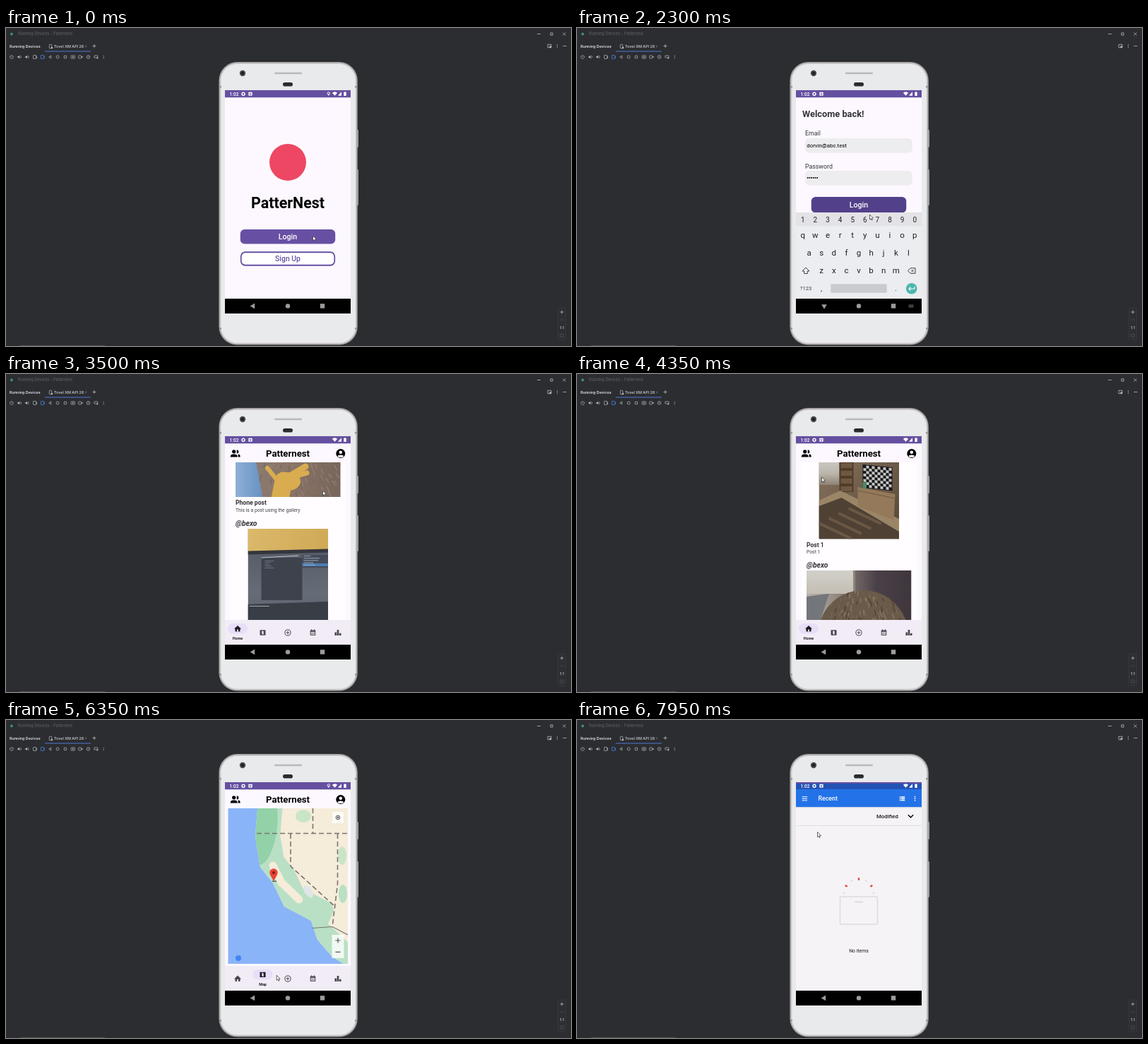
Write an HTML page with a canvas that moves like this. It is 800x450 px and loops after 8 s.

```html
<!DOCTYPE html>
<html lang="en">
<head>
<meta charset="utf-8">
<title>App walkthrough</title>
<style>
html, body { margin: 0; width: 100%; height: 100%; overflow: hidden; background: #2b2d30; }
canvas { display: block; width: 800px; height: 450px; }
</style>
</head>
<body>
<canvas id="stage" width="800" height="450"></canvas>
<script>
const ctx = document.getElementById('stage').getContext('2d');
const LOOP = 8000, STEP = 50, TAU = Math.PI * 2;
const PURPLE = '#6750a4', PRESSED = '#53408a', INK = '#1d1b20', SOFT = '#35333a', PAGE = '#fdf8ff';
const APP = 'Patternest', MAIL = 'dorvin@abc.test';
const CX = 399; // centre of the phone

// ---- drawing helpers ----
function paint(fill, stroke, lw = 1) {
  if (fill) { ctx.fillStyle = fill; ctx.fill(); }
  if (stroke) { ctx.strokeStyle = stroke; ctx.lineWidth = lw; ctx.stroke(); }
}
function rect(x, y, w, h, fill) {
  ctx.fillStyle = fill;
  ctx.fillRect(x, y, w, h);
}
function box(x, y, w, h, r, fill, stroke, lw) {
  ctx.beginPath();
  ctx.roundRect(x, y, w, h, r);
  paint(fill, stroke, lw);
}
// box given by its centre
function mid(x, y, w, h, r, fill, stroke, lw) {
  box(x - w / 2, y - h / 2, w, h, r, fill, stroke, lw);
}
function oval(x, y, rx, ry, fill, turn = 0) {
  ctx.beginPath();
  ctx.ellipse(x, y, rx, ry, turn, 0, TAU);
  paint(fill);
}
function circle(x, y, r, fill, stroke, lw) {
  arc(x, y, r, 0, TAU, fill, stroke, lw);
}
function arc(x, y, r, from, to, fill, stroke, lw) {
  ctx.beginPath();
  ctx.arc(x, y, r, from, to);
  paint(fill, stroke, lw);
}
function trace(pts) {
  ctx.beginPath();
  for (let i = 0; i < pts.length; i += 2) ctx.lineTo(pts[i], pts[i + 1]);
}
function poly(fill, ...pts) {
  trace(pts);
  ctx.closePath();
  paint(fill);
}
function line(stroke, lw, ...pts) {
  trace(pts);
  paint(null, stroke, lw);
}
// triangle around a centre, pointing along the angle
function tri(x, y, r, angle, fill) {
  ctx.beginPath();
  for (let i = 0; i < 3; i++) {
    const a = angle + i * TAU / 3;
    ctx.lineTo(x + r * Math.cos(a), y + r * Math.sin(a));
  }
  ctx.closePath();
  paint(fill);
}
function plus(x, y, r, color, lw = 1) {
  line(color, lw, x - r, y, x + r, y);
  line(color, lw, x, y - r, x, y + r);
}
function cross(x, y, r, color, lw = .8) {
  line(color, lw, x - r, y - r, x + r, y + r);
  line(color, lw, x - r, y + r, x + r, y - r);
}
function kebab(x, y, gap, r, color) {
  for (let i = -1; i < 2; i++) circle(x, y + i * gap, r, color);
}
function text(s, x, y, size, color, style = '', align = 'left', family = 'Roboto') {
  ctx.font = `${style} ${size}px ${family}, sans-serif`;
  ctx.textAlign = align;
  ctx.fillStyle = color;
  ctx.fillText(s, x, y);
}
function clipped(x, y, w, h, draw) {
  ctx.save();
  ctx.beginPath();
  ctx.rect(x, y, w, h);
  ctx.clip();
  draw();
  ctx.restore();
}
function fade(x0, y0, x1, y1, ...colors) {
  const g = ctx.createLinearGradient(x0, y0, x1, y1);
  colors.forEach((c, i) => g.addColorStop(i / (colors.length - 1), c));
  return g;
}
function seeded(n) {
  return () => (n = n * 16807 % 2147483647) / 2147483647;
}

// ---- timing helpers ----
const clamp = v => Math.max(0, Math.min(1, v));
const ease = v => v * v * (3 - 2 * v);
const span = (t, from, to) => clamp((t - from) / (to - from));
function track(keys, t) {
  let i = 0;
  while (i < keys.length - 2 && t >= keys[i + 1][0]) i++;
  const [a, b] = [keys[i], keys[i + 1]];
  const p = ease(span(t, a[0], b[0]));
  return a.slice(1).map((v, k) => v + (b[k + 1] - v) * p);
}
// time, x, y of each place the pointer heads for
const POINTER = [
  [350, 434.5, 294], [800, 372, 164], [1650, 372, 210], [2250, 414.5, 264], [2450, 414.5, 264],
  [2800, 448.5, 165], [3600, 448.5, 165], [4350, 346.5, 146], [4850, 473, 110],
  [5400, 368.5, 329.5], [5900, 363, 363], [6800, 403.5, 359.5], [7400, 400, 240], [7950, 340.5, 158.5]
];
const SCROLL = [[2750, 57], [3400, -301], [3650, -301], [4250, 0]];

// ---- desktop window ----
const TOOL = {
  power(x, y, c) { arc(x, y, 2.4, -1, 4.14, null, c, .7); line(c, .7, x, y - 3, x, y); },
  sound(x, y, c) { tri(x - .8, y, 2.4, Math.PI, c); arc(x, y, 2.4, -1, 1, null, c, .7); },
  turn(x, y, c) { mid(x, y, 4, 5, .5, null, c, .7); line(c, .7, x + 3, y - 1.5, x + 3, y + 2); },
  back(x, y, c) { line(c, .7, x + 1.5, y - 2, x - 1.5, y, x + 1.5, y + 2, x + 1.5, y - 2); },
  ring(x, y, c) { circle(x, y, 2, null, c, .7); },
  square(x, y, c) { mid(x, y, 3.4, 3.4, 0, null, c, .7); },
  shot(x, y, c) { mid(x, y, 5.4, 4.2, .6, null, c, .7); circle(x, y, 1, c); },
  clip(x, y, c) { mid(x - 1, y, 4, 3.8, .5, null, c, .7); tri(x + 2.2, y, 1.4, Math.PI, c); },
  clock(x, y, c) { circle(x, y, 2.3, null, c, .7); line(c, .6, x, y - 1.4, x, y, x + 1, y + .6); },
  link(x, y, c) { mid(x, y - .5, 5, 3, .3, null, c, .7); circle(x + 2, y + 1.5, 1.1, c); },
  more(x, y, c) { kebab(x, y, 1.8, .55, c); }
};
const TOOLBAR = 'power sound sound turn turn back ring square shot clip clock link more'.split(' ');

function desktop() {
  rect(0, 0, 800, 450, '#2b2d30');
  const g = '#b9bbc0';
  circle(8, 8.5, 2, '#3f8a86');
  text('Running Devices - ' + APP, 17, 10.4, 5.6, '#62656b', '', 'left', 'Inter');
  text('Running Devices', 5, 27.6, 5.4, '#dfe1e5', '600', 'left', 'Inter');
  text('Tovel XM API 28', 68, 27.6, 5.4, '#d3d5d9', '500', 'left', 'Inter');
  rect(55, 32.4, 65, 1.2, '#4b69b8');
  mid(63, 26, 3.5, 5.5, .8, null, g, .7);
  circle(65, 28, 1.3, g);
  cross(113, 25.8, 1.3, '#7b7e85', .6);
  plus(125, 25.5, 2.6, g, .8);
  TOOLBAR.forEach((name, i) => TOOL[name](8 + i * 10.85, 41, i === 4 ? '#548af7' : g));

  line(g, .8, 752, 8.5, 757, 8.5);
  mid(772.5, 8.5, 3.2, 3.2, 0, null, g, .8);
  cross(790.5, 8.5, 2, g);
  mid(769.5, 25.5, 5, 4.5, 0, null, g, .8);
  rect(769.5, 25.5, 2.5, 2.5, g);
  kebab(780.5, 25.5, 1.8, .6, g);
  line(g, .8, 788.5, 25.5, 793.5, 25.5);

  mid(787, 418.5, 11, 45, 2, '#2d2f33', '#3e4045', .6);
  plus(787, 402, 2.4, g, .8);
  line('#505257', .8, 784.6, 413, 789.4, 413);
  text('1:1', 787, 425.8, 5, g, '600', 'center', 'Inter');
  mid(787, 435, 4.4, 4, 0, null, '#505257', .8);
  rect(20, 449, 120, 1, '#505257');
}

// ---- phone shell and system bars ----
function shell() {
  box(495, 144, 4, 25, 1.2, '#a7a4a6');
  box(495, 200, 4, 51, 1.2, '#a7a4a6');
  ['#a19ea0', '#cfccce', '#e9eaec'].forEach((c, i) =>
    mid(399.6, 248.3, 196.4 - i * 3, 400.4 - i * 3, 26 - i * 1.5, c));
  for (const y of [82, 424]) for (const x of [302, 494]) rect(x, y, 3, 2.5, '#9a9799');
  circle(335, 64, 4.2, '#4a4a4d');
  circle(335, 64, 2.2, '#202024');
  mid(399.5, 64, 39, 2.6, 1.3, '#b9b9bb');
  mid(CX, 79.8, 14, 5.6, 2.8, '#2b2b2e');
}
function statusBar(color, located) {
  const w = '#fff', y = 93.2;
  rect(310, 88, 178, 10.3, color);
  text('1:02', 316.5, 95.6, 6.6, w, '500');
  circle(336, y, 1.9, null, w, 1.3);
  for (let i = 0; i < 8; i++)
    circle(336 + 2.5 * Math.cos(i * TAU / 8), y + 2.5 * Math.sin(i * TAU / 8), .5, w);
  mid(346, y, 5.2, 5, .6, w);
  rect(344.5, y - 1.2, 3, .7, color);
  rect(345, y + .3, 2, 1.2, color);
  if (located) {
    circle(456.8, y - .8, 1.7, null, w, .9);
    tri(456.8, y + 1.2, 1.6, Math.PI / 2, w);
  }
  ctx.beginPath();
  ctx.moveTo(465.5, 95.8);
  ctx.arc(465.5, 95.8, 5.4, -2.3, -.84);
  paint(w);
  poly(w, 470, 95.8, 475, 90.3, 475, 95.8);
  mid(480, y, 3.4, 5.4, .5, w);
}
function systemNav(typing) {
  const g = '#9c9c9c', y = 393.4;
  rect(310, 383, 178, 21, '#000');
  tri(350, y, 4.4, typing ? Math.PI / 2 : Math.PI, g);
  if (typing) mid(473, y, 7, 4.5, .7, '#3e3e3e');
  circle(CX, y, 3.2, g);
  mid(448, y, 6.4, 6.4, 0, g);
}

// ---- shared app parts ----
function button(label, x, y, w, h, size, fill) {
  mid(x, y, w - (fill ? 0 : 2), h - (fill ? 0 : 2), 6, fill || '#fff', fill ? null : PURPLE, 1.8);
  text(label, x, y + size * .36, size, fill ? '#fff' : PURPLE, '500', 'center');
}
function account(x, y, r) {
  circle(x, y, r, '#000');
  circle(x, y - r * .27, r * .35, PAGE);
  oval(x, y + r * .56, r * .62, r * .27, PAGE);
}
function person(x, y) {
  circle(x, y - 2.7, 2.6, '#000');
  box(x - 5, y + 1, 10, 4, [4, 4, 0, 0], '#000');
}
function header() {
  arc(326.8, 109.8, 2.6, -1.6, 1.6, '#000');
  box(328.6, 113.6, 3, 3.9, [0, 3, 0, 0], '#000');
  person(322.7, 112.5);
  text(APP, CX, 117.4, 13.2, '#000', 'bold', 'center');
  account(473.8, 112.5, 6.5);
}
const TABS = [
  (x, y, c, bg) => {
    poly(c, x, y - 4.4, x + 5, y + .4, x - 5, y + .4);
    mid(x, y + 1.6, 7, 4.8, 0, c);
    mid(x, y + 2.6, 2, 3, 0, bg);
  },
  (x, y, c, bg) => {
    mid(x, y, 8, 7.4, .6, c);
    poly(bg, x - 1.2, y - 2.8, x + 1.2, y - 2, x + 1.2, y + 2.8, x - 1.2, y + 2);
  },
  (x, y, c) => { circle(x, y, 4.1, null, c, 1); plus(x, y, 2.2, c, 1); },
  (x, y, c, bg) => {
    mid(x, y + .2, 7.6, 7.6, .8, c);
    for (const d of [-2, 2]) mid(x + d, y - 4, 1, 1.4, 0, c);
    mid(x, y + 1, 5.6, 4.3, 0, bg);
    for (let i = 0; i < 6; i++) mid(x + (i % 3 - 1) * 1.7, y + .2 + (i > 2) * 1.7, 1, 1, 0, c);
  },
  (x, y, c) => [4.5, 8, 3.2].forEach((h, i) => rect(x - 4.5 + i * 3.2, y + 4 - h, 2.6, h, c))
];
function tabs(active, label) {
  const bar = '#f2ecf6', pill = '#e8def8';
  rect(310, 348, 178, 35, bar);
  TABS.forEach((icon, i) => {
    const x = 328 + i * 35.5, on = i === active;
    if (on) mid(x, 360.3, 28, 14.5, 7.2, pill);
    icon(x, on ? 360.4 : 366, on ? INK : '#49454f', on ? pill : bar);
    if (on && label) text(label, x, 376.2, 5.4, INK, 'bold', 'center');
  });
}

// ---- sign-in screens ----
function welcome(t) {
  circle(CX, 190, 26, '#ee4763');
  text('PatterNest', CX, 255.3, 21.4, '#000', 'bold', 'center');
  button('Login', CX, 295.3, 134.5, 20.5, 10.6, t < 300 ? PURPLE : PRESSED);
  button('Sign Up', CX, 326.5, 134.5, 20.5, 10.4);
}
function login(t) {
  text('Welcome back!', 319, 126, 12.8, SOFT, 'bold');
  ['Email', 'Password'].forEach((label, i) => {
    text(label, 323, 152.2 + i * 47, 8.8, SOFT);
    box(323, 156 + i * 46, 152, 20.8, 6, '#ededef');
  });
  text(MAIL.slice(0, Math.floor(span(t, 850, 1500) * MAIL.length)), 325.3, 169.4, 7.8, '#000');
  const dots = Math.floor(span(t, 1650, 2050) * 6);
  for (let i = 0; i < dots; i++) circle(326.7 + i * 2.7, 212, 1, '#000');
  button('Login', CX, 250.3, 134.5, 22.5, 10.6, t < 2200 ? PURPLE : PRESSED);
  clipped(310, 98, 178, 285, () => {
    ctx.translate(0, 122 * (1 - ease(span(t, 600, 750))));
    keyboard();
  });
}
function keyboard() {
  const ink = '#3c4043';
  rect(310, 261, 178, 122, '#ecedf0');
  rect(310, 261, 178, 19, '#e3e3e7');
  ['1234567890', 'qwertyuiop', 'asdfghjkl', 'zxcvbnm'].forEach((row, r) => {
    const y = r ? 272 + r * 25 : 274.8;
    [...row].forEach((key, i) =>
      text(key, CX + (i - (row.length - 1) / 2) * 17.6, y, r ? 11.5 : 10, '#202124', '', 'center'));
  });
  line(ink, 1, 321.7, 344, 319, 344, 324, 339, 329, 344, 326.3, 344, 326.3, 347.5, 321.7, 347.5, 321.7, 344);
  line(ink, 1, 468.5, 343.5, 472, 339.8, 479, 339.8, 479, 347.2, 472, 347.2, 468.5, 343.5);
  cross(475, 343.5, 1.6, ink, .9);
  text('?123', 324, 371.2, 7.6, ink, '', 'center');
  text(',', 346, 372, 11, ink, '', 'center');
  text('.', 451.5, 372, 11, ink, '', 'center');
  mid(CX, 368.6, 79.5, 12.5, 1.5, '#cacbce');
  circle(473.7, 368.8, 7.8, '#4db6ac');
  line('#fff', 1.1, 478, 366, 478, 369, 470, 369);
  line('#fff', 1.1, 472.5, 366.5, 470, 369, 472.5, 371.5);
}

// ---- feed: each photo is a few flat shapes in its own box ----
function photo(x, y, w, h, draw) {
  ctx.save();
  ctx.translate(x, y);
  clipped(0, 0, w, h, () => draw(w, h));
  ctx.restore();
}
function roomPhoto(w, h) {
  rect(0, 0, w, h, fade(0, 42, w, h, '#85735f', '#6d5b48', '#574737'));
  rect(0, 0, 29, 74, fade(0, 42, 0, 74, '#c9c6c0', '#bbb5ab', '#8e8274'));
  rect(29, 0, 20, 84, '#503c2a');
  for (let y = 10; y < 80; y += 11) rect(31, y, 16, 7, '#6f5840');
  poly('#9b8567', 0, 96, 30, 82, w, 122, w, h, 0, h);
  poly('#4f4134', 0, 104, 32, 92, w, 140, w, h, 0, h);
  for (let i = 0; i < 4; i++) line('#6a5845', 4, i * 14, 128 - i * 7, 46 + i * 14, 150 - i * 7);
  poly('#94795a', 55, 77, 108, 87, 106, 124, 55, 104);
  line('#6f5a42', 1.2, 55, 82, 108, 93);
  ctx.transform(1, .1, 0, 1, 62, 45);
  rect(0, 0, 42, 33, '#17171a');
  for (let i = 0; i < 80; i++) {
    const col = i % 10, row = Math.floor(i / 10);
    if ((col + row) % 2) rect(1 + col * 4, 1 + row * 3.9, 4, 3.9, '#c4c5c2');
  }
  rect(0, 25, 5, 9, '#4a8c62');
}
function fur(count, w, y, h, colors) {
  const rnd = seeded(7);
  for (let i = 0; i < count; i++) {
    const px = rnd() * w, py = y + rnd() * h, lean = (px - w * .5) * .07;
    line(colors[i % colors.length], 1.4, px, py, px + lean, py + 4 + rnd() * 5);
  }
}
function petPhoto(w, h) {
  rect(0, 0, w, h, fade(0, 0, w, 0, '#b9b4ab', '#8c8178', '#4a4049', '#3f363c'));
  rect(0, 0, 66, 33, fade(0, 0, 0, 33, '#d2d0c9', '#c3beb4'));
  rect(66, 0, 3, 50, '#8d857c');
  poly('#73767b', 0, 37, 32, 33, 18, 75, 0, 75);
  oval(80, 92, 64, 64, '#6a5a4a');
  ctx.save();
  ctx.beginPath();
  ctx.ellipse(80, 92, 64, 64, 0, 0, TAU);
  ctx.clip();
  fur(260, w, 28, 70, ['#897862', '#4e4136', '#75654f']);
  ctx.restore();
  rect(0, 120, w, 77, fade(0, 0, w, 0, '#877a75', '#8b7667', '#77655b'));
  fur(160, w, 122, 75, ['#937f70', '#7a685d']);
  poly(fade(0, 0, 36, 0, '#8db0d6', '#6a92c4'), 0, 120, 26, 130, 38, h, 0, h);
  const hand = '#d9ac50';
  ctx.lineCap = 'round';
  line(hand, 6, 45, 156, 58, 172);
  line(hand, 9, 72, 170, 99, 154);
  line(hand, 7, 75, 170, 101, 163);
  line(hand, 25, 68, 174, 62, h + 8);
  oval(74, 175, 18, 13, hand);
  ctx.lineCap = 'butt';
}
function screenPhoto(w, h) {
  rect(0, 0, w, h, fade(0, 30, 0, h, '#575d68', '#656b77', '#555b66'));
  poly(fade(0, 0, w, 30, '#dbb96b', '#cfa955'), 0, 0, w, 0, w, 30, 0, 33);
  line('#34363c', 5, 0, 34, w, 31);
  rect(19, 41, 58, 60, '#3e424c');
  line('#c0c4c8', 1.2, 19, 41, 72, 38);
  rect(77, 37, 37, 18, '#454b58');
  rect(77, 49, 37, 4, '#4c7db5');
  const rnd = seeded(5);
  for (let i = 0; i < 5; i++) {
    rect(79, 38 + i * 3.2, 10 + rnd() * 16, .9, '#a0adbf');
    rect(24, 45 + i * 2.5, 5 + rnd() * 12, .7, '#7d8691');
  }
  poly('#383d46', 0, 107, w, 103, w, h, 0, h);
  rect(2, 109, 28, 1, '#a5aaaf');
}
function post(y, pic, x, w, h, title, note) {
  text('@bexo', 325, y - 4.2, 10.3, SOFT, 'italic bold');
  photo(x, y, w, h, pic);
  if (!title) return;
  text(title, 325, y + h + 11, 8.6, SOFT, '600');
  text(note, 325, y + h + 20.5, 6.8, '#444');
}
function feed(t) {
  clipped(310, 125, 178, 223, () => {
    rect(317, 125, 164, 223, '#fffdff');
    ctx.translate(0, track(SCROLL, t)[0]);
    post(83, roomPhoto, 342.5, 113.5, 150.5, 'Post 1', 'Post 1');
    post(278, petPhoto, 325, 148.5, 197, 'Phone post', 'This is a post using the gallery');
    post(520, screenPhoto, 342.5, 113.5, 151);
  });
}

// ---- other screens ----
function profile() {
  account(347, 159, 27);
  text('@dorvin', 321.5, 211.5, 12.4, SOFT);
  text('Email: ' + MAIL, 321.5, 235.9, 6.9, SOFT);
  text(APP + ': 18', 321.5, 259.1, 6.9, SOFT);
  button('Change Password', 355, 287.8, 81, 17, 6.4);
  button('Privacy Options', 443.5, 287.8, 81, 17, 6.4);
  button('Sign Out', CX, 311.5, 108.5, 18, 6.4, PURPLE);
}
const COAST = [357, 115, 353, 165, 360, 208, 378, 231, 394, 264, 432, 284, 441, 311, 462, 335, 486, 350];
function map() {
  const border = '#77746f', green = '#b9e0c4', cream = '#f5ecd9';
  clipped(314.5, 125, 169.5, 220, () => {
    rect(314, 125, 170, 220, '#8ab4f8');
    ctx.save();
    trace([...COAST, 486, 115]);
    paint(cream);
    ctx.clip();
    line(green, 70, ...COAST);
    oval(362, 150, 22, 56, '#93d1a8', .1);
    poly(cream, 403, 160, 403, 207, 467, 265, 456, 288, 490, 320, 490, 160);
    ctx.lineCap = 'round';
    line(cream, 11, 378, 206, 390, 230, 415, 254);
    ctx.lineCap = 'butt';
    oval(421, 136, 11, 9, '#c9e5c6');
    oval(476, 192, 6, 13, '#c9e5c6');
    oval(477, 246, 6, 13, green);
    oval(428, 243, 5, 10, '#dfe5e8', -.6);
    ctx.restore();

    ctx.setLineDash([7, 4]);
    line(border, 1.6, 355, 160.5, 484, 160.5);
    line(border, 1.6, 434.5, 125, 434.5, 160);
    line(border, 1.6, 403, 161, 403, 207, 467, 265);
    line(border, 1.6, 469.5, 161, 469.5, 232, 462, 293);
    ctx.setLineDash([]);
    line(border, 1.2, 434, 294.5, 462, 292.5, 484, 304);

    rect(377, 227.5, 6, 1.5, '#566069');
    poly('#ea4335', 374, 219, 384, 219, 379, 228);
    circle(379, 216, 5.7, '#ea4335');
    circle(379, 216, 2, '#7c1d18');
    const panel = 'rgba(255,255,255,.8)', g = '#555';
    mid(470, 138, 16, 16, 0, panel);
    circle(470, 138, 2.9, null, g, 1);
    circle(470, 138, 1.4, g);
    mid(470, 320.5, 17, 33, 0, panel);
    plus(470, 312, 3.6, g, 1.2);
    line(g, 1.2, 466.4, 328.3, 473.6, 328.3);
    circle(329, 337, 4, '#4285f4');
  });
}
function picker() {
  const w = '#fff', faint = '#dcdcdf';
  rect(310, 88, 178, 2, '#65509f');
  rect(310, 98, 178, 25.5, '#2472e8');
  for (let i = -1; i < 2; i++) {
    mid(322.4, 111.3 + i * 2.6, 7.4, 1, 0, w);
    mid(457.5, 111.3 + i * 2.3, 1.4, 1.6, 0, w);
    mid(461.5, 111.3 + i * 2.3, 5.4, 1.6, 0, w);
  }
  kebab(478.5, 111.2, 2.6, .9, w);
  text('Recent', 341.5, 114.4, 8.8, w, '500');
  rect(310, 123.5, 178, 260, '#f5f3f6');
  rect(310, 123.5, 178, 1, faint);
  rect(310, 149, 178, .8, faint);
  text('Modified', 424, 139.2, 7.8, INK, '500');
  line('#111', 1.5, 468.8, 134.2, 472.5, 137.9, 476.2, 134.2);
  mid(CX, 269.5, 53, 39, 1.5, null, faint, 1.6);
  mid(CX, 257.4, 12.5, 2, .8, faint);
  for (let i = 0; i < 7; i++) {
    ctx.save();
    ctx.translate(CX, 246);
    ctx.rotate((183 + i * 29) * TAU / 360);
    mid(21, 0, i % 2 ? 3.4 : 2.4, 2.4, 0, i % 2 ? '#e0433d' : faint);
    ctx.restore();
  }
  text('No items', CX, 328.6, 6.9, INK, '', 'center');
}

function pointer(x, y) {
  ctx.save();
  ctx.translate(x, y);
  trace([0, 0, 0, 7, 1.6, 5.6, 2.7, 8, 3.8, 7.5, 2.8, 5.2, 4.9, 5]);
  ctx.closePath();
  paint('#fff', '#26262a', .7);
  ctx.restore();
}

// ---- what is on the phone, and from when ----
const inApp = (body, tab, label) => t => { header(); body(t); tabs(tab, label); };
const SCREENS = [
  { from: 0, draw: welcome, located: true },
  { from: 400, draw: login },
  { from: 2450, draw: inApp(feed, 0, 'Home') },
  { from: 4850, draw: inApp(profile, -1) },
  { from: 6000, draw: inApp(map, 1, 'Map'), located: true },
  { from: 7050, draw: inApp(() => {}, 2), located: true },
  { from: 7700, draw: picker, bar: '#2453b4' }
];
function draw(t) {
  const screen = SCREENS.findLast(s => t >= s.from);
  desktop();
  shell();
  rect(310, 88, 178, 316, PAGE);
  statusBar(screen.bar || '#6550a0', screen.located);
  screen.draw(t);
  systemNav(screen.draw === login && t >= 650);
  pointer(...track(POINTER, t));
}

const start = performance.now();
function tick() {
  const t = (performance.now() - start) % LOOP;
  draw(Math.floor(t / STEP) * STEP);
  requestAnimationFrame(tick);
}
tick();
</script>
</body>
</html>
```
